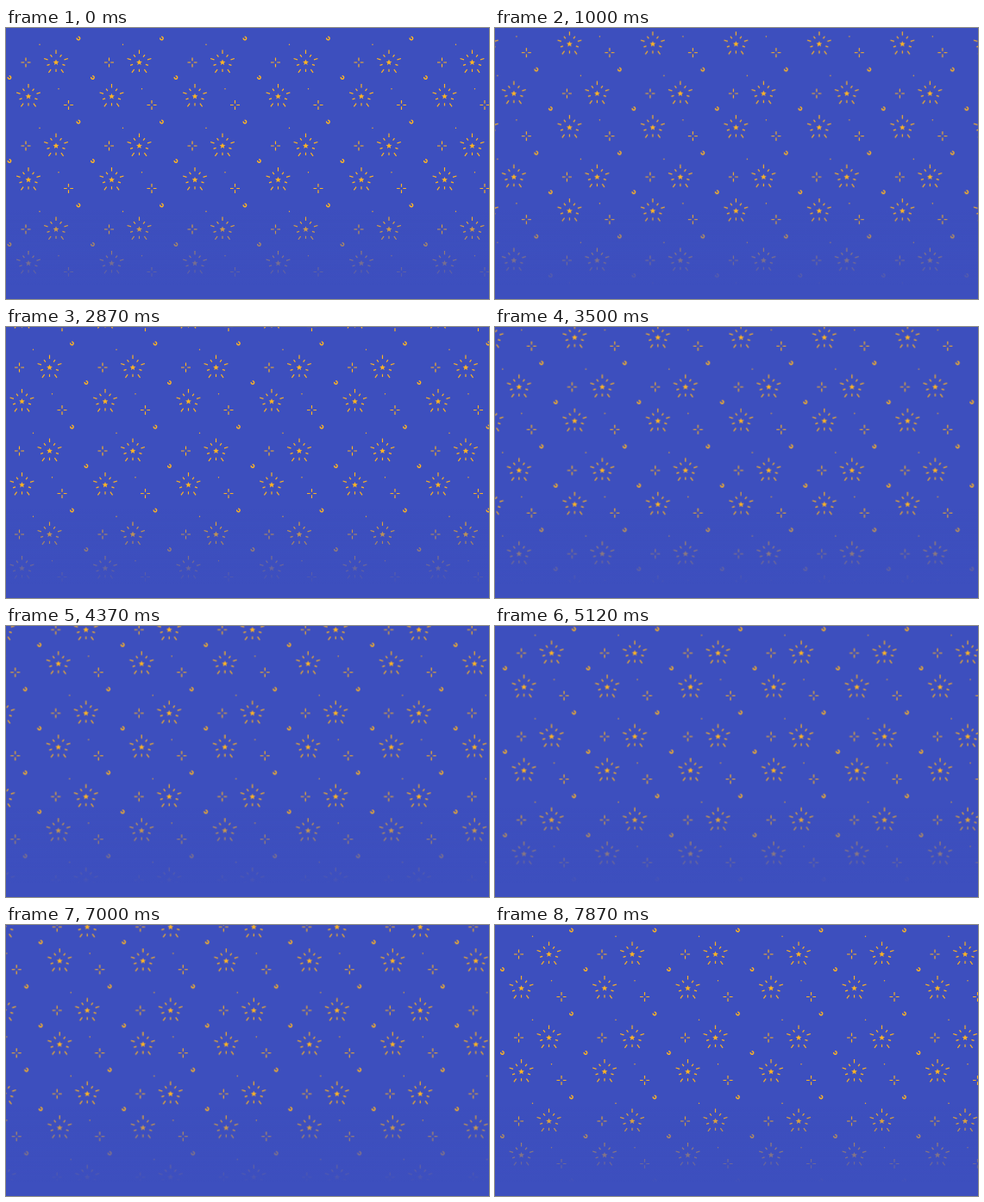
Write an HTML page that moves like this. It is 560 px wide and 315 px high and loops after 8000 ms.

```html
<!DOCTYPE html>
<html lang="en">
<head>
<meta charset="utf-8">
<title>Drifting stars</title>
<style>
  :root { --sky: #3d4fbe; --gold: #ffb422; }
  html, body { margin: 0; width: 100%; height: 100%; overflow: hidden; background: var(--sky); }
  svg { display: block; position: absolute; inset: 0; }
  .line { fill: none; stroke: var(--gold); stroke-width: 1.15; }
  .fill { fill: var(--gold); }
  #sky { animation: drift 8s steps(64) -6ms infinite; }
  @keyframes drift {
    to { transform: translate(-289.5px, 289.5px); }
  }
  .fade {
    position: absolute; left: 0; right: 0; top: 212px; bottom: 0;
    background: linear-gradient(rgba(61, 79, 190, 0), var(--sky) 87px);
  }
</style>
</head>
<body>
<svg width="560" height="315" viewBox="0 0 560 315">
  <defs>
    <g id="burst">
      <path id="star" class="fill"/>
      <path id="rays" class="line"/>
    </g>
    <path id="plus" class="line" d="M0-5.5V-1.8M0 1.8V5.5M-5.5 0H-1.8M1.8 0H5.5"/>
    <path id="ring" class="line" style="stroke-width:1.4" d="M-.3-1.75A1.75 1.75 0 1 1-1.7-.6"/>
    <circle id="dot" class="fill" r=".7"/>
    <g id="tile">
      <use href="#burst" x="58" y="40"/>
      <use href="#burst" x="26" y="79.5"/>
      <use href="#plus" x="23" y="40"/>
      <use href="#plus" x="72.5" y="89.5"/>
      <use href="#ring" x="84" y="12"/>
      <use href="#ring" x="4" y="57.5"/>
      <use href="#dot" x="39" y="19.3"/>
      <use href="#dot" x="61" y="70.8"/>
    </g>
  </defs>
  <g id="sky"></g>
</svg>
<div class="fade"></div>
<script>
  const TILE_W = 96.5, TILE_H = 97;
  const byId = id => document.getElementById(id);

  // Angle in tenths of a turn, clockwise from the top
  const polar = (r, k) => {
    const a = k * Math.PI / 5;
    return (r * Math.sin(a)).toFixed(2) + ' ' + (-r * Math.cos(a)).toFixed(2);
  };

  let star = '', rays = '';
  for (let k = 0; k < 10; k++) {
    const point = k % 2 === 0;
    star += (k ? 'L' : 'M') + polar(point ? 3.6 : 1.6, k);
    rays += 'M' + polar(point ? 10 : 7.8, k) + 'L' + polar(point ? 14.6 : 11, k);
  }
  byId('star').setAttribute('d', star + 'Z');
  byId('rays').setAttribute('d', rays);

  for (let row = -4; row <= 3; row++) {
    for (let col = -1; col <= 9; col++) {
      const use = document.createElementNS('http://www.w3.org/2000/svg', 'use');
      use.setAttribute('href', '#tile');
      use.setAttribute('x', col * TILE_W);
      use.setAttribute('y', row * TILE_H);
      byId('sky').append(use);
    }
  }
</script>
</body>
</html>
```
